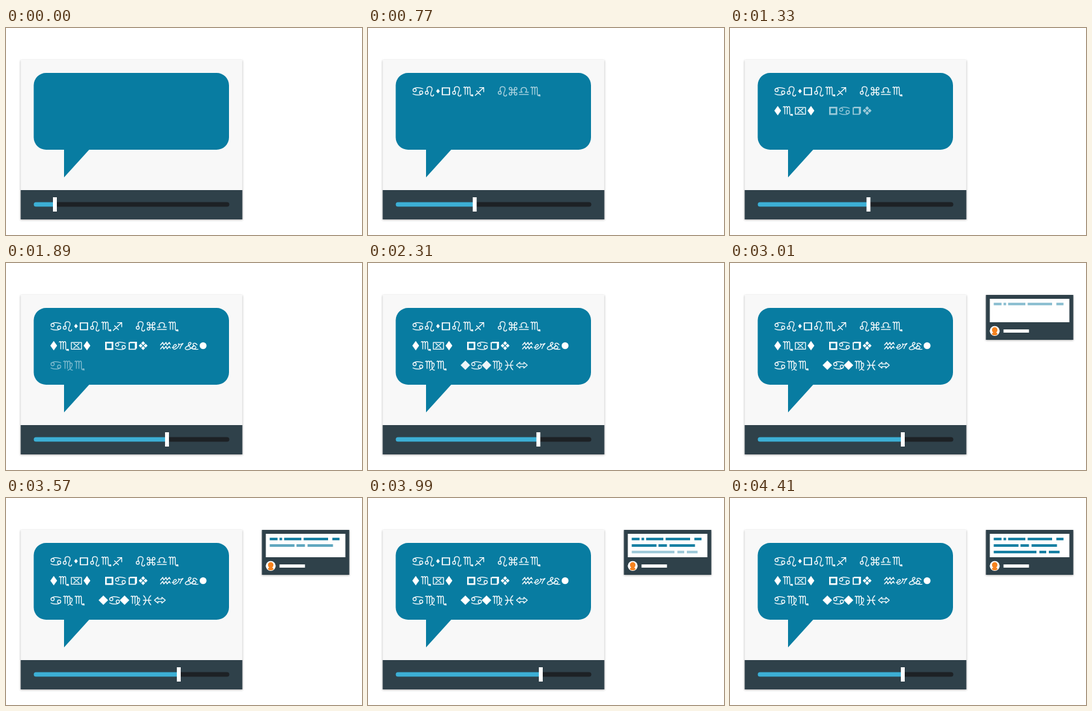
Write an HTML page that moves like this. It is 546 px wide and 318 px high and loops after 5.25 s.

```html
<!DOCTYPE html>
<html lang="en">
<head>
<meta charset="utf-8">
<title>Captioned message</title>
<style>
  html, body { margin: 0; width: 100%; height: 100%; overflow: hidden; background: #fff; }
  svg { display: block; width: 546px; height: 318px; }
  .panel, .card { filter: drop-shadow(0 1px 1.5px rgba(0, 0, 0, .32)); }
  .line { fill: none; stroke: #fff; stroke-width: 1.25; stroke-linejoin: round; stroke-linecap: round; }
  .bold { fill: none; stroke: #fff; stroke-width: 2.5; }
  .box { fill: none; stroke: #fff; stroke-width: 1.7; }
  .solid { fill: #fff; }
</style>
</head>
<body>
<svg viewBox="0 0 546 318">
  <g class="panel">
    <rect x="22.5" y="49" width="340" height="245" fill="#f8f8f8"/>
    <rect x="22.5" y="249" width="340" height="45" fill="#2f414a"/>
  </g>
  <path fill="#087ca1" d="M61.5 69H323A19 19 0 0 1 342 88V168A19 19 0 0 1 323 187H127.5L89 229.5V187H61.5A19 19 0 0 1 42.5 168V88A19 19 0 0 1 61.5 69Z"/>
  <g id="speech"></g>
  <rect x="42.5" y="267.5" width="300" height="7" rx="3.5" fill="#1d2125"/>
  <rect id="fill" x="42.5" y="267.5" width="33" height="7" rx="3.5" fill="#3dafd5"/>
  <rect id="knob" y="260" width="6" height="22" fill="#fff"/>
  <g id="card">
    <rect class="card" x="392.5" y="49" width="134" height="69" fill="#2f414a"/>
    <rect x="398.5" y="55" width="122" height="36" fill="#fff"/>
    <circle cx="406" cy="104.3" r="7.6" fill="#fff"/>
    <path fill="#f5821f" d="M401.8 102.6a4.2 4.2 0 0 1 8.4 0c0 2-.9 3.6-2.1 4.4 1.2.4 2 1 2.4 2.2-2.4 2.5-6.6 2.5-9 0 .4-1.2 1.2-1.8 2.4-2.2-1.200-.8-2.100-2.400-2.100-4.400z"/>
    <rect x="419.500" y="102" width="39" height="5" fill="#fff"/>
  </g>
  <g id="rows" fill="#1880a3"></g>
</svg>
<script>
const LOOP = 5250, STEP = 70;

// Symbol shapes: [class, path]
const glyphs = {
  a: ['line', 'M1 6C2.500 2 10 1.500 16 4.300M1 6.300a2.500 2.500 0 1 0 5 0a2.500 2.500 0 1 0-5 0M16 10.500C14.500 14.500 7 15 1 12.200M11 10.200a2.500 2.500 0 1 0 5 0a2.500 2.500 0 1 0-5 0'],
  b: ['line', 'M.8 10.500a2.300 2.300 0 1 0 4.600 0a2.300 2.300 0 1 0-4.600 0M4.800 8.800C2.500 5.500 3 1 7.300 1C11.800 1 12 5 10.300 8.500C8.500 12 8.500 15.600 11.500 15.600C13 15.600 13.700 14.500 13.700 13.300'],
  c: ['line', 'M.7 2.500C1.800.7 3 1.700 3 3.500V13M3 4C4 .8 6.800.8 6.800 4V13M6.800 4C7.800.8 10.600.8 10.600 4V11C10.600 14 12 15.500 14.500 15.500M10.600 5.500C12.500 3.500 14.500 5 14 8C13.300 11.500 10.500 14 7.500 15.800'],
  d: ['line', 'M1 13H15M1 9.700H5.700C2.700 7.700 3 2.500 8 2.500C13 2.500 13.300 7.700 10.300 9.700H15'],
  e: ['line', 'M.7 2.500C1.800.7 3 1.700 3 3.500V13M3 4C4 .8 6.800.8 6.800 4V13M6.800 4C7.800.8 10.600.8 10.600 4V12C10.600 15.500 13 15.700 14.600 14M12.800 13.600L14.700 13.700V15.700'],
  f: ['line', 'M1 14.500L14 2.500M7.500 2.500H14V9M3 7.500L9 13.500'],
  h: ['line', 'M1 7L4.500 3L6 7L9.500 3L11 7L14.500 3L16 6M1 13L4.500 9L6 13L9.500 9L11 13L14.500 9L16 12'],
  i: ['line', 'M1.500 1C6 5 6 11 1.500 15M12.500 1C8 5 8 11 12.500 15M1 8H13'],
  j: ['line', 'M.7 10.800C5 11 8.500 8.300 7 6.700C5 5 1.500 8.500 2.200 11.700C3 15 8 13 10.500 9C11.500 7.300 11.800 5 10.500 5.200C9.600 6 13 7 17.500 4.500C15 7 13.500 10 12.700 12.500'],
  k: ['line', 'M19 6.500C16 3 12 4 13 6.500C13.500 8 16 8.500 16 8.500C11 8 9.500 12.500 13 13.200C16.500 13.800 18.500 10.500 16.500 9.500M13 9.500C7 15.500 0 15 1 11.500C2 8.500 9 8 9.800 4.500C10 2 6 2.500 5.800 5.500C5.600 10 12 14.500 20.500 13.500'],
  l: ['solid', 'M0 8a5.300 5.300 0 1 0 10.600 0a5.300 5.300 0 1 0-10.600 0'],
  o: ['box', 'M1 3H12V13.500H1Z'],
  p: ['bold', 'M1.300 3.200H11.300V13.200H1.300Z'],
  r: ['box', 'M1 3.500H10.500V13.500H1ZM2 2.800H12V12.500'],
  s: ['solid', 'M2.800 4.500L5.600 8L2.800 11.500L0 8Z'],
  t: ['solid', 'M5.200.8L10.400 8L5.200 15.200L0 8Z'],
  u: ['solid', 'M7.300.7L14.600 8L7.300 15.300L0 8Z'],
  v: ['solid', 'M6.500 1.200l3 3l-3 3l-3-3zM6.500 8.800l3 3l-3 3l-3-3zM2.700 5l3 3l-3 3l-3-3zM10.300 5l3 3l-3 3l-3-3z'],
  w: ['line', 'M.7 8L6 3.500V6H12V3.500L17.300 8L12 12.500V10H6V12.500Z'],
  x: ['line', 'M.7 3H16.300V13.300H.7ZM4.500 4.800L12.500 11.500M12.500 4.800L4.500 11.500'],
  z: ['line', 'M5 12V4A2 2 0 1 0 3 6H11A2 2 0 1 0 9 4V12A2 2 0 1 0 11 10H3A2 2 0 1 0 5 12Z']
};

// Words: top edge, then symbol and left edge pairs
const words = [
  [89, 'a68 b87 s104.5 o113 b129 e146 f163.500'],
  [89, 'b199 z215.500 d231 e249'],
  [119, 't68 e81 x99.500 t119'],
  [119, 'p152 a167 r188 v203.800'],
  [119, 'h236 j254 k274 l297'],
  [149, 'a68 c87.500 e105'],
  [149, 'u142 a158 u174.500 c191 i209.500 w227']
];

// Card text bars: top edge, then left and right pairs
const rows = [
  [61, 404.5, 416.5, 419.5, 423.5, 426.5, 453, 456.5, 494, 500.5, 511.5],
  [71, 404.5, 442.5, 445.5, 458.5, 462.5, 501.5],
  [81, 404.5, 470, 474.5, 485, 489, 505.5]
];

const $ = id => document.getElementById(id);

function add(parent, tag, attrs = {}) {
  const el = document.createElementNS('http://www.w3.org/2000/svg', tag);
  for (const key in attrs) el.setAttribute(key, attrs[key]);
  return parent.appendChild(el);
}

const fades = [];
const fade = (el, start, length, power) => fades.push({ el, start, length, power });

words.forEach(([top, text], i) => {
  const word = add($('speech'), 'g');
  for (const item of text.split(' ')) {
    const [type, d] = glyphs[item[0]];
    add(word, 'path', { class: type, d, transform: `translate(${+item.slice(1)} ${top})` });
  }
  fade(word, 350 + i * 291, 291, 2);
});

fade($('card'), 2330, 580, 3);

rows.forEach(([y, ...xs], i) => {
  const row = add($('rows'), 'g');
  for (let k = 0; k < xs.length; k += 2)
    add(row, 'rect', { x: xs[k], y, width: xs[k + 1] - xs[k], height: 4 });
  fade(row, 2910 + i * 500, 500, 3);
});

// Quick start, then a sine slow-down to rest
function knobX(t) {
  if (t <= 350) return 75;
  if (t < 770) {
    const s = (770 - t) / STEP;
    return 163.5 - 6.8 * s - 1.325 * s * s;
  }
  const u = Math.min(1, (t + 72) / 2725);
  return 75 + 190 * Math.sin(u * Math.PI / 2);
}

function draw(now) {
  let t = Math.floor((now % LOOP) / STEP) * STEP;
  if (t < 420) t = 0;
  for (const { el, start, length, power } of fades) {
    const u = Math.min(1, Math.max(0, (t - start) / length));
    el.setAttribute('opacity', 1 - (1 - u) ** power);
  }
  const x = knobX(t);
  $('knob').setAttribute('x', x - 3);
  $('fill').setAttribute('width', x - 42.5);
}

const begin = performance.now();
function tick() {
  draw(performance.now() - begin);
  requestAnimationFrame(tick);
}
tick();
</script>
</body>
</html>
```
